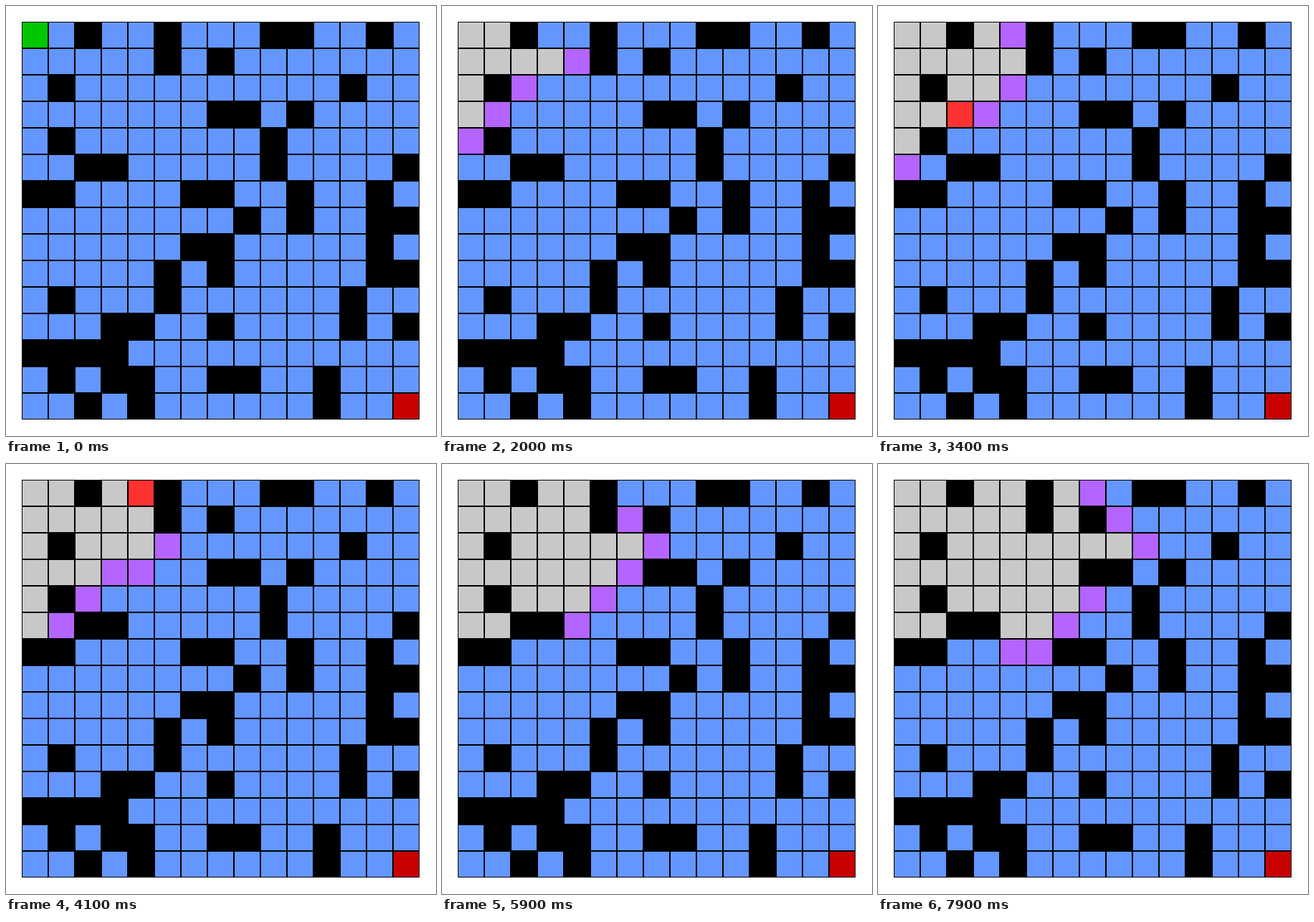
A matplotlib script for the animation above (8000 ms loop, 600 px wide and 600 px high).

```python
from collections import deque
from itertools import islice

import matplotlib.pyplot as plt
from matplotlib.animation import FuncAnimation
from matplotlib.patches import Rectangle

SIZE, ORIGIN, PITCH, N = 600, 22, 37, 15
FRAMES, INTERVAL = 80, 100

MAZE = """
..#..#...##..#.
.....#.#.......
.#..........#..
.......##.#....
.#.......#.....
..##.....#....#
##....##..#..#.
........#.#..##
......##.....#.
.....#.#.....##
.#...#......#..
...##..#....#.#
####...........
.#.##..##..#...
..#.#......#...
""".split()

FREE, START, GOAL = "#6496ff", "#00c800", "#c80000"
QUEUED, CURRENT, VISITED = "#b464ff", "#ff3232", "#c8c8c8"
STEPS = ((0, 1), (1, 0), (0, -1), (-1, 0))  # right, down, left, up

cells = [(r, c) for r in range(N) for c in range(N) if MAZE[r][c] == "."]
start, goal = (0, 0), (N - 1, N - 1)


def search():
    """Breadth-first search, yielding the cell colours after every event."""
    colors = dict.fromkeys(cells, FREE)
    colors[start], colors[goal] = START, GOAL
    yield dict(colors)

    queue, seen = deque([start]), {start}
    colors[start] = QUEUED
    yield dict(colors)

    while queue:
        r, c = cell = queue.popleft()
        colors[cell] = CURRENT
        yield dict(colors)
        colors[cell] = VISITED
        for dr, dc in STEPS:
            nxt = r + dr, c + dc
            if nxt in colors and nxt not in seen:
                seen.add(nxt)
                queue.append(nxt)
                colors[nxt] = QUEUED
                yield dict(colors)


states = list(islice(search(), FRAMES))

fig = plt.figure(figsize=(SIZE / 100, SIZE / 100), dpi=100, facecolor="white")
ax = fig.add_axes([0, 0, 1, 1])
ax.set(xlim=(0, SIZE), ylim=(SIZE, 0))
ax.axis("off")


def square(x, y, side, color):
    return ax.add_patch(Rectangle((x, y), side, side, facecolor=color, linewidth=0))


square(ORIGIN, ORIGIN, N * PITCH, "black")
tiles = {
    (r, c): square(ORIGIN + c * PITCH + 1, ORIGIN + r * PITCH + 1, PITCH - 2, FREE)
    for r, c in cells
}


def update(i):
    for cell, color in states[i].items():
        tiles[cell].set_facecolor(color)
    return list(tiles.values())


anim = FuncAnimation(fig, update, frames=FRAMES, interval=INTERVAL,
                     repeat=True, repeat_delay=0)
plt.show()
```
